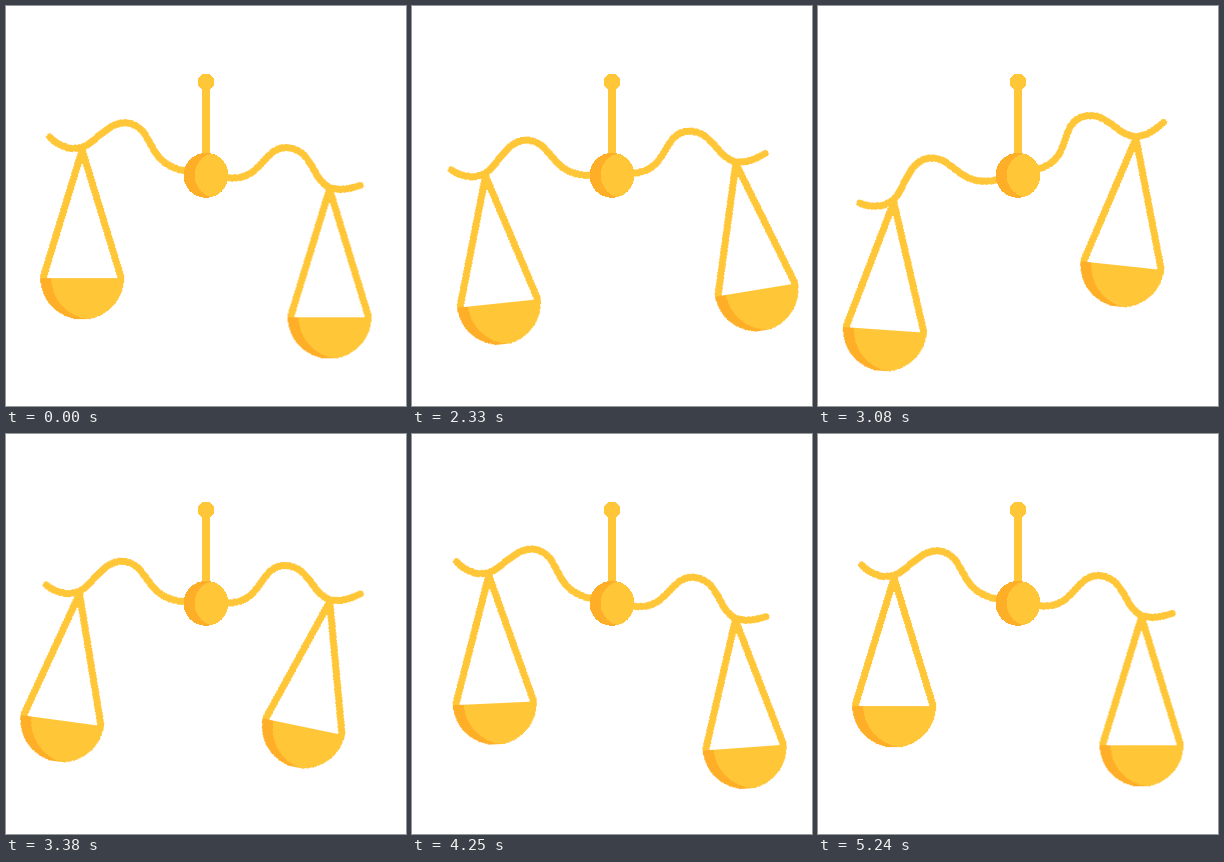
Animation of 400 by 400 pixels, one loop 5270 ms. Source, as an HTML page:

```html
<!DOCTYPE html>
<html lang="en">
<head>
<meta charset="utf-8">
<title>Swinging scales</title>
<style>
  html, body { margin: 0; width: 100%; height: 100%; overflow: hidden; background: #fff; }
  svg { display: block; width: 100vw; height: 100vh; shape-rendering: crispEdges; }

  .light { fill: #ffc637; }
  .dark { fill: #ffaf27; }
  .line { fill: none; stroke: #ffc637; stroke-width: 7; stroke-linecap: round; stroke-linejoin: round; }

  .beam, .level, .left, .right { animation: 5270ms infinite; }
  .beam { --dir: 1; animation-name: tilt; }
  /* undoes the beam's tilt so that each pan hangs straight */
  .level { --dir: -1; animation-name: tilt; }
  .left { animation-name: swing-left; }
  .right { animation-name: swing-right; }

  @keyframes tilt {
    0% { transform: rotate(calc(var(--dir) * 9.1deg)); }
    38.52% { transform: rotate(calc(var(--dir) * 9.1deg)); animation-timing-function: cubic-bezier(.25, 0, .5, 1); }
    54.46% { transform: rotate(calc(var(--dir) * -19deg)); animation-timing-function: cubic-bezier(.364, 0, .636, 1); }
    72.68% { transform: rotate(calc(var(--dir) * 18.9deg)); animation-timing-function: cubic-bezier(.364, 0, .636, 1); }
    85.2% { transform: rotate(calc(var(--dir) * 6.8deg)); animation-timing-function: cubic-bezier(.364, 0, .636, 1); }
    100% { transform: rotate(calc(var(--dir) * 9.1deg)); }
  }

  @keyframes swing-left {
    0% { transform: rotate(0deg); }
    38.52% { transform: rotate(0deg); animation-timing-function: cubic-bezier(.4, 0, .5, 1); }
    45.92% { transform: rotate(-6.5deg); animation-timing-function: cubic-bezier(.2, 0, .75, 1); }
    64.71% { transform: rotate(7.8deg); animation-timing-function: cubic-bezier(.55, 0, .43, 1); }
    78.94% { transform: rotate(-2.9deg); animation-timing-function: cubic-bezier(.364, 0, .636, 1); }
    89.56% { transform: rotate(1deg); animation-timing-function: cubic-bezier(.364, 0, .636, 1); }
    100% { transform: rotate(0deg); }
  }

  @keyframes swing-right {
    0% { transform: rotate(0deg); }
    38.52% { transform: rotate(0deg); animation-timing-function: cubic-bezier(.4, 0, .5, 1); }
    46.11% { transform: rotate(-10.3deg); animation-timing-function: cubic-bezier(.2, 0, .7, 1); }
    65.09% { transform: rotate(11.9deg); animation-timing-function: cubic-bezier(.5, 0, .5, 1); }
    78.94% { transform: rotate(-4.5deg); animation-timing-function: cubic-bezier(.364, 0, .636, 1); }
    89.56% { transform: rotate(1.4deg); animation-timing-function: cubic-bezier(.364, 0, .636, 1); }
    100% { transform: rotate(0deg); }
  }
</style>
</head>
<body>
<svg viewBox="0 0 400 400">
  <defs>
    <g id="pan">
      <path class="line" d="M-38.5 128 L0 2 L38.5 128"/>
      <g transform="translate(0 129.5)">
        <path class="dark" d="M-42 0 A42 42 0 0 0 42 0 Z"/>
        <path class="light" d="M-31 0 A42 42 0 0 0 5.5 41.6 A42 42 0 0 0 42 0 Z"/>
      </g>
    </g>
  </defs>

  <rect class="light" x="196" y="76" width="8" height="80"/>
  <circle class="light" cx="200" cy="76" r="8.5"/>

  <g transform="translate(200 168.6)">
    <g class="beam">
      <path class="line" d="M-160 -12.3 C-150 -4 -134 -2 -124 -9 C-112 -18 -103 -38.5 -85 -38.5 C-58 -38.5 -62 -1 -22 -.5
        L22 -.5 C57 -1 52 -39.5 78 -39.5 C101 -39.5 104 -17 119 -9 C128 -3.5 142 -7 154 -13.8"/>
      <g transform="translate(-126.5 -6.6)">
        <g class="level"><g class="left"><use href="#pan"/></g></g>
      </g>
      <g transform="translate(124 -7)">
        <g class="level"><g class="right"><use href="#pan"/></g></g>
      </g>
    </g>
  </g>

  <g transform="translate(200 169.3)">
    <circle class="dark" r="22.5"/>
    <path class="light" d="M5.5 -21.8 A22.5 22.5 0 0 1 5.5 21.8 A22.5 22.5 0 0 1 5.5 -21.8 Z"/>
  </g>
</svg>
</body>
</html>
```
